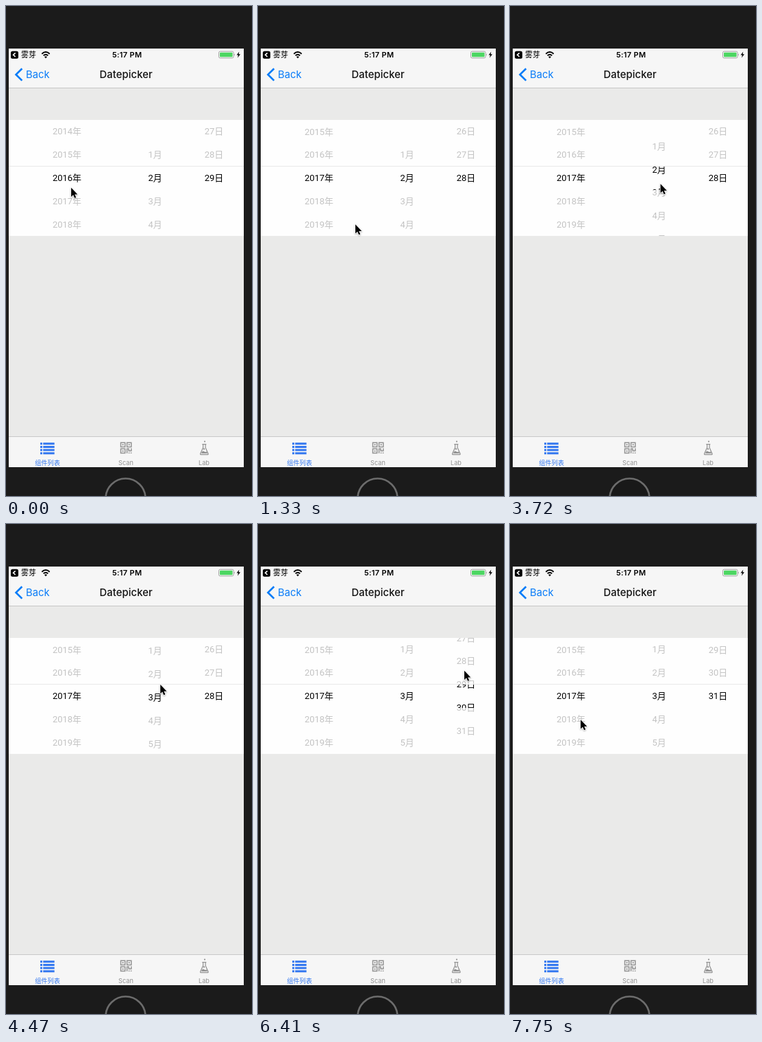
An HTML page that plays this animation: 359x714 px, repeating every 8 s.

```html
<!DOCTYPE html>
<html lang="zh-CN">
<head>
<meta charset="utf-8">
<title>Datepicker</title>
<style>
html, body { margin: 0; width: 100%; height: 100%; overflow: hidden; background: #1b1b1b; }
svg { display: block; width: 359px; height: 714px; }
text { font-family: Inter, "Noto Sans CJK SC", "Noto Sans CJK", sans-serif; }
.mid { text-anchor: middle; }
.wheel text { font: 13px Roboto, "Noto Sans CJK SC", "Noto Sans CJK", sans-serif; text-anchor: middle; }
.tab { font-size: 9.2px; text-anchor: middle; fill: #929292; }
#cursor { filter: drop-shadow(0 1px 1px rgba(0, 0, 0, .3)); }
</style>
</head>
<body>
<svg viewBox="0 0 359 714">
  <defs>
    <clipPath id="window"><rect x="4" y="166" width="343" height="169"/></clipPath>
  </defs>

  <circle cx="174.5" cy="717.5" r="29" fill="#191919" stroke="#6c6c6c" stroke-width="2.6"/>
  <rect x="4" y="62" width="343" height="610" fill="#eaeae9"/>

  <!-- status and navigation bars -->
  <rect x="4" y="62" width="343" height="57" fill="#f6f6f6"/>
  <path d="M4 119.5H347" stroke="#c6c6c6"/>
  <rect x="7" y="65.7" width="11" height="11" rx="2.5"/>
  <path d="M13.7 68.4L10.6 71.2L13.7 74" fill="none" stroke="#fff" stroke-width="1.6"/>
  <text x="22" y="75" font-size="11">雾芽</text>
  <g fill="none" stroke="#000" stroke-width="1.9">
    <path d="M52.3 69.7Q58 64.4 63.7 69.7"/>
    <path d="M54.7 72.3Q58 69.2 61.3 72.3"/>
  </g>
  <path d="M56 74Q58 72.3 60 74L58 76.2Z"/>
  <text class="mid" x="176.7" y="75" font-size="11" font-weight="600" letter-spacing=".3">5:17 PM</text>
  <rect x="310.5" y="66.2" width="21.6" height="9.6" rx="2" fill="#fafafa" stroke="#a2a2a2"/>
  <rect x="312" y="67.7" width="18.6" height="6.6" rx=".8" fill="#4cd662"/>
  <path d="M333.2 69.5Q335 71 333.2 72.5Z" fill="#8d8d8d"/>
  <path d="M340.3 66.5L336.6 71.6H339L337.9 75.6L342 70.3H339.5Z"/>
  <path d="M23.4 91.2L14.6 99.9L23.4 108.6" fill="none" stroke="#0a7cf8" stroke-width="2.7"/>
  <text x="29" y="105.3" font-size="14.8" fill="#0a7cf8">Back</text>
  <text class="mid" x="175.1" y="105.3" font-size="14.8" font-weight="500" letter-spacing=".1" fill="#111">Datepicker</text>

  <!-- picker -->
  <rect x="4" y="166" width="343" height="169" fill="#fefefe"/>
  <g class="wheel" clip-path="url(#window)">
    <g id="year"></g>
    <g id="month"></g>
    <g id="day"></g>
  </g>
  <g fill="#fefefe" fill-opacity=".77">
    <rect x="4" y="166" width="343" height="68"/>
    <rect x="4" y="268" width="343" height="67"/>
  </g>
  <path d="M4 233.5H347" stroke="#e9e9e9"/>

  <!-- tab bar -->
  <rect x="4" y="627" width="343" height="45" fill="#f6f6f6"/>
  <path d="M4 627.5H347" stroke="#c8c8c8"/>
  <path d="M50 637.7h3m1.2 0H70.7M50 642.4h3m1.2 0H70.7M50 647.1h3m1.2 0H70.7M50 651.8h3m1.2 0H70.7" stroke="#3478f0" stroke-width="3"/>
  <text class="tab" x="60.5" y="669" style="fill:#3478f0">组件列表</text>
  <g fill="none" stroke="#929292" stroke-width="1.5">
    <path d="M167.5 636.2h6.2v6.2h-6.2zM176.6 636.2h6.2v6.2h-6.2zM167.5 645.3h6.2v6.2h-6.2z"/>
    <path d="M169.6 639.3h2M178.7 639.3h2M169.6 648.4h2" stroke-width="2"/>
    <path d="M176.6 651.8V645.3H179.2V648.2H182.8V644.6M178.8 651.3h1.6m1.4 0h1.6"/>
  </g>
  <text class="tab" x="175" y="669">Scan</text>
  <g fill="none" stroke="#929292" stroke-width="1.2">
    <path d="M286.3 638.6H292.3M287.6 638.6V643.6L283.6 652.4Q283.4 653.6 284.6 653.6H294.2Q295.4 653.6 295.1 652.4L291.1 643.6V638.6"/>
    <path d="M286.2 649.2Q288 648 289.5 649.2T292.8 649.2L294 652H285Z" fill="#929292" stroke="none"/>
    <circle cx="290" cy="634.6" r="1.1" fill="#929292" stroke="none"/>
    <circle cx="289" cy="645.4" r=".6"/>
  </g>
  <text class="tab" x="289" y="669">Lab</text>

  <g id="cursor">
    <path transform="translate(.2 .2) scale(.91)" d="M1 1.6V16.2L4.3 13.2L6.5 18.3L8.9 17.3L6.7 12.3H11.2Z" stroke="#fff" stroke-width="1.6" stroke-linejoin="round" paint-order="stroke"/>
  </g>
</svg>
<script>
const LOOP = 8000, TICK = 149.1, LEAD = 12;
const ROW = 33.85, CENTER = 250.6;
const byId = id => document.getElementById(id);

const linear = p => p;
const easeOut = p => 1 - (1 - p) ** 1.4;
const lateRush = p => p ** 5.6;

// Each move starts at a screen tick and lasts some ticks; a drag turns a wheel.
const rest = { x: 94, y: 263, year: 2016, month: 2, day: 29 };
const moves = [
  { at: 1, steps: 4, to: { x: 94, y: 222, year: 2017 }, drag: true },
  { at: 7, steps: 3, to: { x: 141, y: 316.5, day: 28 } },
  { at: 11, steps: 4, to: { x: 124, y: 275 } },
  { at: 16, steps: 4, to: { x: 216, y: 274 }, ease: lateRush },
  { at: 24, steps: 4, to: { x: 221, y: 241, month: 2.75 }, drag: true, ease: linear },
  { at: 29, steps: 3, to: { x: 225, y: 230, month: 3 }, drag: true },
  { at: 32, steps: 4, to: { x: 243, y: 335.5 } },
  { at: 37, steps: 3, to: { x: 289, y: 279 } },
  { at: 41, steps: 3, to: { x: 300, y: 212, day: 29.5 }, drag: true, ease: linear },
  { at: 44, steps: 4, to: { x: 300, y: 172, day: 31 }, drag: true },
  { at: 49, steps: 2, to: { x: 46, y: 354 } },
  { at: 51, steps: 2, to: { x: 102, y: 283.5 } }
];

const daysIn = s => new Date(s.year, s.month, 0).getDate();

function pose(tick) {
  const s = { ...rest, lastDay: daysIn(rest) };
  for (const { at, steps, to, drag, ease = easeOut } of moves) {
    if (tick < at) break;
    if (!drag) s.lastDay = daysIn(s); // the month length updates on release
    const k = ease(Math.min(1, (tick - at + 1) / steps));
    for (const key in to) s[key] += (to[key] - s[key]) * k;
  }
  return s;
}

function wheel(id, x, first, last, unit) {
  const group = byId(id);
  for (let v = first; v <= last; v++) {
    const item = document.createElementNS('http://www.w3.org/2000/svg', 'text');
    item.setAttribute('x', x);
    item.setAttribute('y', CENTER + 4.6 + (v - first) * ROW);
    item.textContent = v + unit;
    group.append(item);
  }
  return (value, max = last) => {
    group.setAttribute('transform', `translate(0 ${(first - value) * ROW})`);
    [...group.children].forEach((item, i) => {
      item.style.display = first + i > max ? 'none' : '';
    });
  };
}

const year = wheel('year', 89, 2012, 2021, '年');
const month = wheel('month', 217.7, 1, 12, '月');
const day = wheel('day', 303.5, 1, 31, '日');

function draw(tick) {
  const s = pose(tick);
  byId('cursor').setAttribute('transform', `translate(${s.x} ${s.y})`);
  year(s.year);
  month(s.month);
  day(s.day, s.lastDay);
}

const start = performance.now();
let shown = -1;
function frame() {
  const now = (performance.now() - start) % LOOP;
  const tick = Math.floor((now + LEAD) / TICK);
  if (tick !== shown) draw(shown = tick);
  requestAnimationFrame(frame);
}
frame();
</script>
</body>
</html>
```
